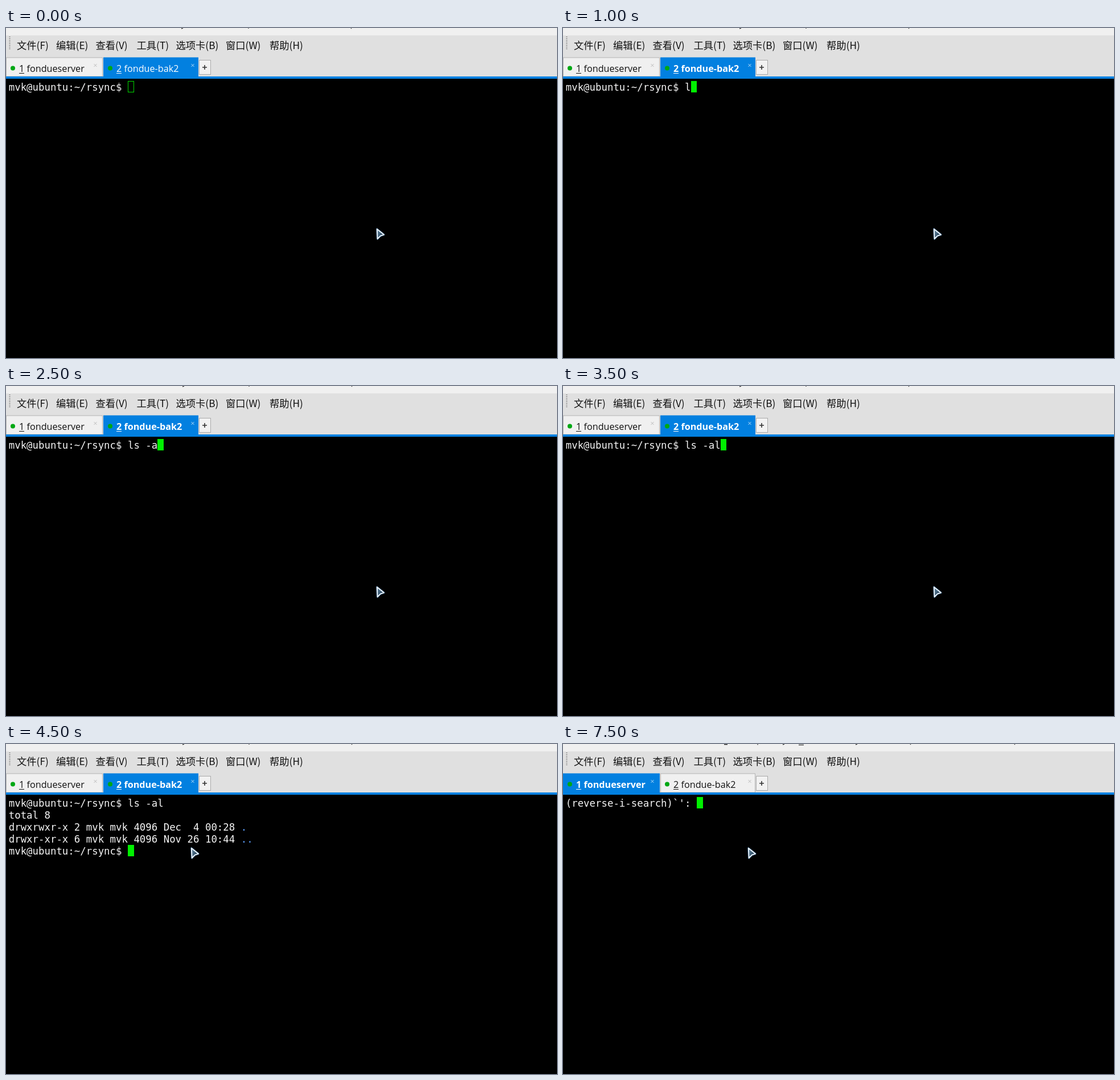
An HTML page that plays this animation: 968x579 px, repeating every 8000 ms.

```html
<!DOCTYPE html>
<html lang="zh">
<head>
<meta charset="utf-8">
<style>
  html, body { margin: 0; width: 100%; height: 100%; overflow: hidden; background: #000; }
  svg { display: block; }
  text { white-space: pre; }
  .menu { font: 17.3px "Noto Sans CJK SC", "Noto Sans CJK", sans-serif; }
  .tab { font: 16.2px "Open Sans", "Noto Sans", sans-serif; }
  .active { font-weight: 700; }
  .term { font: 17.39px "DejaVu Sans Mono", monospace; fill: #f4f4f4; }
  .dir { fill: #5c9cf8; }
</style>
</head>
<body>
<svg id="stage" width="968" height="579" viewBox="0 0 968 579">
  <defs>
    <linearGradient id="steel" x1="0" y1="0" x2="1" y2="1">
      <stop offset="0" stop-color="#6f93ad"/>
      <stop offset="1" stop-color="#0d2740"/>
    </linearGradient>
  </defs>
  <rect width="968" height="579"/>
  <rect width="968" height="86" fill="#e0e0e0"/>
  <rect width="968" height="13" fill="#f0f0f0"/>
  <path d="M6.5 15V38" stroke="#666" stroke-width="2" stroke-dasharray="1 2"/>
  <g id="title" stroke="#333" stroke-width="1.4" fill="none"></g>
  <g id="menu" class="menu" fill="#111"></g>
  <g id="tabs"></g>
  <rect x="339.5" y="56.5" width="20" height="25" fill="#f2f2f2" stroke="#aaa"/>
  <path d="M345 69h8M349 65v8" stroke="#333" stroke-width="1.6"/>
  <rect y="85" width="968" height="4" fill="#0280e0"/>
  <g id="term" class="term"></g>
  <rect id="caret"/>
  <g id="mouse" stroke-linejoin="round">
    <path d="M1.8 1.8L14 11.6L8 13.6L2.6 19Z" fill="none" stroke="#2d6ea8" stroke-width="3.4" opacity=".6"/>
    <path d="M1.8 1.8L14 11.6L8 13.6L2.6 19Z" fill="url(#steel)" stroke="#eef7ff" stroke-width="1.9"/>
  </g>
</svg>
<script>
const $ = id => document.getElementById(id);
const CELL = 10.47, LEFT = 4.72, ROW = 21, LOOP = 8000;

const home = "mvk@ubuntu:~/rsync$ ";
const listing = [
  home + "ls -al",
  "total 8",
  "drwxrwxr-x 2 mvk mvk 4096 Dec  4 00:28 |.",
  "drwxr-xr-x 6 mvk mvk 4096 Nov 26 10:44 |..",
  home
];

// Each step overrides part of the state before it.
const steps = [
  { at: 0, lines: [home], focus: false, active: 1, mouse: [650, 351],
    title: "M308 1.2l3 -1.2M426 0v1M607 0l-1 1" },
  { at: 500, focus: true, title: "M310 1.2l3 -1.2M427 0v1M608 0l-1 1" },
  { at: 1000, lines: [home + "l"] },
  { at: 2000, lines: [home + "ls "] },
  { at: 2500, lines: [home + "ls -a"] },
  { at: 3500, lines: [home + "ls -al"] },
  { at: 4000, lines: listing },
  { at: 4500, mouse: [324, 181] },
  { at: 5500, lines: ["mvk@ubuntu:/git/scripts/rsync_concurrency$ "], active: 0,
    title: "M283 .8h6M342 0v1.6M386 1.2l3 -1.2M414 1.6h9M514 1.2l3 -1.2M611 0l-1 1M794 0l-1 1" },
  { at: 7500, lines: ["(reverse-i-search)`': "] }
];
const states = [];
for (const step of steps) states.push({ ...states.at(-1), ...step });

const tabs = [
  { x: 0, w: 170, name: "fondueserver" },
  { x: 171, w: 167, name: "fondue-bak2" }
];

$("menu").innerHTML = [
  [19, "文件(F)"], [88, "编辑(E)"], [157.5, "查看(V)"], [229.5, "工具(T)"],
  [298.5, "选项卡(B)"], [386, "窗口(W)"], [463, "帮助(H)"]
].map(([x, s]) => `<text x="${x}" y="37">${s}</text>`).join("");

function drawTab({ x, w, name }, i, on, bold) {
  const ink = on ? "#fff" : "#111";
  const face = on
    ? `<rect x="${x}" y="51.5" width="${w}" height="34" fill="#0280e0"/>`
    : `<rect x="${x + .5}" y="52" width="${w - 1}" height="33" fill="#f0f0f0" stroke="#b4b4b4"/>`;
  return face +
    `<circle cx="${x + 12}" cy="70.5" r="4" fill="#00a814"/>
     <text class="tab ${bold ? "active" : ""}" x="${x + 23}" y="77" fill="${ink}">${i + 1} ${name}</text>
     <path d="M${x + 23} 79.5h9" stroke="${ink}"/>
     <path d="M${x + 154.5} 63l5 5m0 -5l-5 5" stroke="${on ? "#b9dcf7" : "#bbb"}"/>`;
}

function drawCaret(col, row, solid) {
  const left = Math.round(LEFT + col * CELL);
  const right = Math.round(LEFT + (col + 1) * CELL);
  const inset = solid ? 0 : .5;
  const box = {
    x: left + inset,
    y: 93 + row * ROW + inset,
    width: right - left - 2 * inset,
    height: 20 - 2 * inset,
    fill: solid ? "#00f000" : "none",
    stroke: solid ? "none" : "#00d800"
  };
  for (const key in box) $("caret").setAttribute(key, box[key]);
}

function draw({ lines, focus, active, mouse, title }) {
  $("title").innerHTML = `<path d="${title}"/>`;
  $("tabs").innerHTML = tabs.map((tab, i) => drawTab(tab, i, i === active, i === active && focus)).join("");
  $("term").innerHTML = lines.map((line, i) => {
    const [plain, dir = ""] = line.split("|");
    return `<text x="${LEFT}" y="${110 + i * ROW}">${plain}<tspan class="dir">${dir}</tspan></text>`;
  }).join("");
  drawCaret(lines.at(-1).length, lines.length - 1, focus);
  $("mouse").setAttribute("transform", `translate(${mouse})`);
}

let shown;
const start = performance.now();
function tick() {
  const t = (performance.now() - start) % LOOP;
  const state = states.findLast(s => s.at <= t);
  if (state !== shown) draw(shown = state);
  requestAnimationFrame(tick);
}
tick();
</script>
</body>
</html>
```
